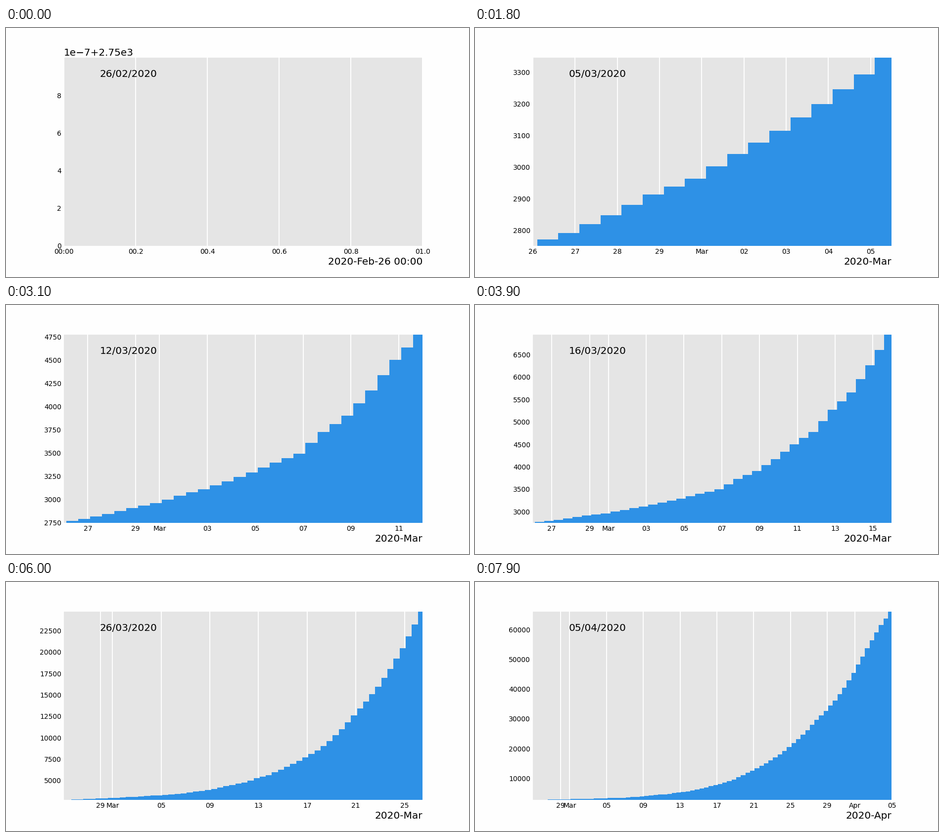
These frames come from a looping animation (936 by 504 pixels, 8000 ms). A matplotlib script:

```python
import numpy as np
import matplotlib.pyplot as plt
import matplotlib.dates as mdates
from matplotlib.animation import FuncAnimation

W, H, DPI = 936, 504, 100
START = mdates.date2num(np.datetime64("2020-02-26"))
SECOND = 1 / 86400
LARGE = 14.4

# one total per day; half days are interpolated
DAILY = [2750, 2791, 2847, 2912, 2962, 3041, 3114, 3198, 3292, 3398,
         3495, 3727, 3904, 4175, 4505, 4774, 5270, 5655, 6262, 6940,
         7702, 8512, 9607, 11010, 12610, 14226, 15956, 18032, 20455, 23190,
         26180, 29700, 32650, 36138, 40457, 45440, 50922, 56404, 61553, 65956]
days = np.arange(0, 39.5, 0.5)
totals = np.interp(days, np.arange(len(DAILY)), DAILY)

fig = plt.figure(figsize=(W / DPI, H / DPI), dpi=DPI, facecolor="#fefefe")
ax = fig.add_axes([0.125, 0.125, 0.775, 0.755], facecolor="#e5e5e5")
ax.spines[:].set_visible(False)
ax.set_axisbelow(True)
ax.tick_params(length=0, pad=3.5, labelsize=10, colors="black")
ax.grid(axis="x", color="white", linewidth=1.4)

locator = mdates.AutoDateLocator()
ax.xaxis.set_major_locator(locator)
ax.xaxis.set_major_formatter(mdates.ConciseDateFormatter(locator))
for axis in (ax.xaxis, ax.yaxis):
    axis.get_offset_text().set_fontsize(LARGE)

bars = ax.bar(START + days, totals, width=0.8, color="#2e91e6", linewidth=0)
label = ax.text(0.1, 0.9, "", transform=ax.transAxes, fontsize=LARGE)


def update(frame):
    n = max(frame - 1, 0)
    for i, bar in enumerate(bars):
        bar.set_visible(i <= n)
    now = START + days[n]
    ax.set_xlim(START, max(now, START + 1.00001 * SECOND))
    ax.set_ylim(DAILY[0], max(totals[n], DAILY[0] + 9.9999e-7))
    label.set_text(mdates.num2date(now).strftime("%d/%m/%Y"))
    return [*bars, label]


anim = FuncAnimation(fig, update, frames=80, interval=100, repeat=True,
                     repeat_delay=0, blit=False)
plt.show()
```
